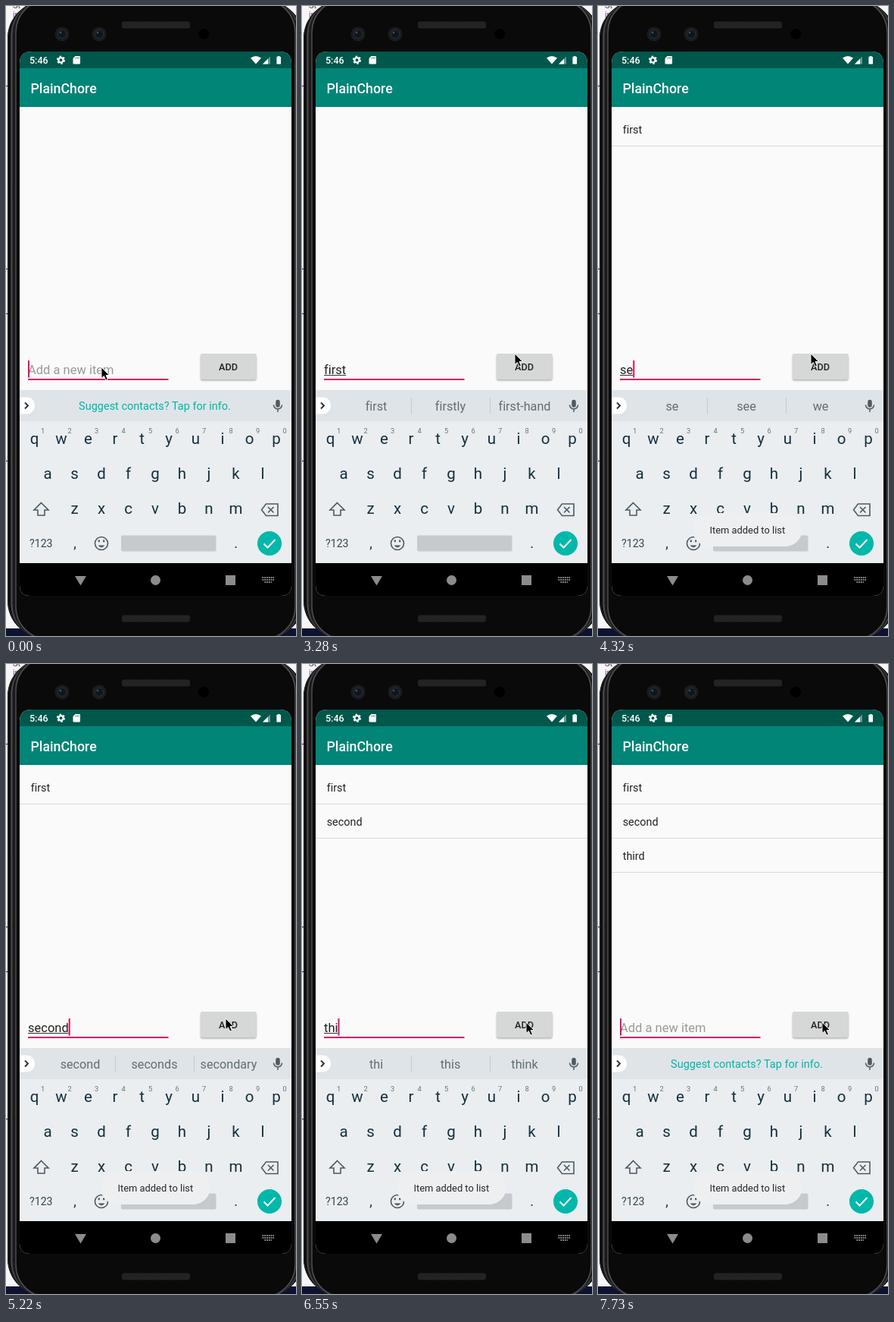
These frames come from a looping animation (383 by 830 pixels, 8000 ms). An HTML page:

```html
<!DOCTYPE html>
<html lang="en">
<head>
<meta charset="utf-8">
<title>Todo list demo</title>
<style>
  html, body { margin: 0; width: 100%; height: 100%; overflow: hidden; background: #f6f6f9; }
  svg { display: block; width: 100%; height: 100%; }
  text { font-family: Roboto, "Noto Sans", sans-serif; font-variant-ligatures: none; white-space: pre; }
  .mid { text-anchor: middle; }
  .medium { font-weight: 500; }
</style>
</head>
<body>
<svg viewBox="0 0 383 830" preserveAspectRatio="none">
  <defs>
    <clipPath id="screenClip"><path d="M18 76q0-16 16-16H361q16 0 16 16V763q0 14-14 14H32q-14 0-14-14Z"/></clipPath>
    <pattern id="mesh" width="3" height="3" patternUnits="userSpaceOnUse">
      <rect width="3" height="3" fill="#1d1d1d"/><path d="M0 3L3 0" stroke="#343434" stroke-width=".8"/>
    </pattern>
    <filter id="soft" x="-20%" y="-40%" width="140%" height="190%"><feGaussianBlur stdDeviation="1.2"/></filter>
  </defs>

  <!-- desktop behind the phone -->
  <text x="9" y="3" font-size="11" fill="#444">St</text>
  <text x="9" y="15" font-size="10" fill="#7a3a8c">in</text>
  <path d="M0 105.5h3M0 346.5h3M0 405.5h3M0 599.5h3" stroke="#1c1c86"/>
  <rect y="820" width="383" height="10" fill="#0d1230"/>

  <!-- phone body -->
  <rect x="2" y="-7" width="391" height="840" rx="50" fill="#0a0a0a"/>
  <g fill="none">
    <rect x="3" y="-6" width="389" height="838" rx="49" stroke="#1a1a1b" stroke-width="2"/>
    <rect x="7.5" y="-7.500" width="380" height="841" rx="47" stroke="#48494b" stroke-width="2.500"/>
    <rect x="10.500" y="-8" width="374" height="842" rx="45.500" stroke="#1b1b1c" stroke-width="3.500"/>
    <rect x="13" y="-9" width="369" height="844" rx="44" stroke="#4d4e50" stroke-width="1.500"/>
  </g>
  <rect x="153" y="20.500" width="90" height="9" rx="3" fill="url(#mesh)"/>
  <rect x="153" y="802.500" width="90" height="9" rx="3" fill="url(#mesh)"/>
  <g id="lenses"></g>
  <circle cx="261" cy="37" r="7" fill="#000"/>

  <g clip-path="url(#screenClip)">
    <rect x="18" y="60" width="359" height="717" fill="#fafafa"/>
    <rect x="18" y="82" width="359" height="51" fill="#008577"/>
    <rect x="18" y="133" width="359" height="1" fill="#f1f2f2"/>
    <rect x="18" y="60" width="359" height="22" fill="#00574b"/>

    <!-- status bar -->
    <g fill="#fff">
      <text class="medium" x="31" y="75.800" font-size="12.500">5:46</text>
      <g transform="translate(72.500 71.200)">
        <circle r="3.100" fill="none" stroke="#fff" stroke-width="2.300"/>
        <circle r="4.700" fill="none" stroke="#fff" stroke-width="1.800" stroke-dasharray="2.460 2.460"/>
      </g>
      <path d="M91.500 66H97q1 0 1 1v8.500q0 1-1 1H89.500q-1 0-1-1V69Z"/>
      <path d="M92.500 67.500v2M94.500 67.500v2M96.300 67.500v2" stroke="#00574b" stroke-width=".8"/>
      <path d="M323 68.500q7-5 14 0l-7 8Z"/>
      <path d="M339 76.500L349 66.500V76.500Z" opacity=".4"/>
      <path d="M339 76.500L346 69.500V76.500Z"/>
      <path d="M358.700 66h3v1h1.300v9.500h-5.600V67h1.300Z"/>
      <text class="medium" x="32.500" y="114.800" font-size="17.800">PlainChore</text>
    </g>

    <g id="rows" font-size="14.400" fill="#222"></g>

    <!-- input line -->
    <text id="hint" x="29" y="484.500" font-size="16.500" fill="#9a9a9a">Add a new item</text>
    <text id="typed" x="29" y="484.500" font-size="16.500" fill="#212121"></text>
    <rect id="compose" x="29" y="486" height="1" fill="#333"/>
    <rect x="29" y="491" width="185.500" height="2" fill="#dc1065"/>
    <rect id="caret" y="467" width="2" height="22.500" fill="#dc1065"/>
    <rect x="257" y="460" width="73.500" height="33.500" rx="2" opacity=".3" filter="url(#soft)"/>
    <rect id="button" x="257" y="458" width="73.500" height="34" rx="2"/>
    <text class="mid medium" x="293.500" y="480" font-size="12.700" fill="#222">ADD</text>

    <!-- keyboard -->
    <rect x="18" y="506" width="359" height="228" fill="#eaeef1"/>
    <rect x="18" y="506" width="359" height="41" fill="#dfe4e8"/>
    <path d="M18 515.500H27a11 11 0 0 1 0 22H18Z" fill="#fff"/>
    <path d="M25 522.500l4 4-4 4" fill="none" stroke="#263238" stroke-width="1.900"/>
    <text id="offer" class="mid" x="196.500" y="532" font-size="14.500" fill="#00b5a5">Suggest contacts? Tap for info.</text>
    <g id="words" class="mid" font-size="16.200" fill="#5f6d75">
      <path d="M144.500 516v21.500M248.500 516v21.500" stroke="#c3cacf"/>
      <text x="98" y="532.800"></text><text x="196" y="532.800"></text><text x="294" y="532.800"></text>
    </g>
    <g fill="none" stroke="#4c5a63" stroke-width="1.500">
      <rect x="357" y="519.500" width="4" height="8.500" rx="2" fill="#4c5a63"/>
      <path d="M353.500 525.500a5.500 5.500 0 0 0 11 0M359 531v4"/>
    </g>
    <g id="keys" class="mid" fill="#14303d"></g>
    <g fill="none" stroke="#4c5a63" stroke-width="1.600">
      <path d="M46.500 654.500L56 664H51V671H42V664H37Z"/>
      <path d="M343.500 656H359V671.500H343.500L337.500 663.800Z"/>
      <path d="M346 660l7.500 7.500M353.500 660l-7.500 7.500"/>
      <circle cx="126" cy="708" r="8.500"/>
      <path d="M121.500 710.500q4.500 5.500 9 0Z" fill="#4c5a63" stroke="none"/>
      <path d="M122.800 703.500v2.800M129.200 703.500v2.800" stroke-width="2.200"/>
    </g>
    <text class="mid" x="46.300" y="713" font-size="14.200" fill="#33464f">?123</text>
    <text class="mid" x="91" y="714" font-size="18" fill="#14303d">,</text>
    <text class="mid" x="303.500" y="714" font-size="18" fill="#14303d">.</text>
    <rect x="152" y="697.500" width="125.500" height="21" rx="2" fill="#c6cacf"/>
    <circle cx="348" cy="708" r="16" fill="#00b8a9"/>
    <path d="M340.500 708.500l5 5 10-10.500" fill="none" stroke="#fff" stroke-width="2"/>

    <!-- navigation -->
    <rect x="18" y="734" width="359" height="43" fill="#000"/>
    <g fill="#8c8c8c">
      <path d="M91 751H106L98.500 763.500Z"/>
      <circle cx="197.500" cy="756.500" r="6.500"/>
      <rect x="290" y="750" width="13" height="13"/>
      <path d="M338.500 753H354M338.500 756H354M341.500 759H351" stroke="#8c8c8c" stroke-width="1.800" stroke-dasharray="1.800 1"/>
    </g>

    <g id="toast">
      <rect x="125" y="668" width="144.500" height="44" rx="22" fill="#eeeff0"/>
      <text class="mid" x="197.300" y="695" font-size="12.900" fill="#262626">Item added to list</text>
    </g>
  </g>

  <path id="pointer" d="M0 0V14.500L3.400 11.400L5.800 17L8.400 15.900L6 10.500H10.500Z" fill="#000" stroke="#fff" stroke-width=".9"/>
</svg>
<script>
const NS = 'http://www.w3.org/2000/svg';
const LOOP = 8000;
const $ = id => document.getElementById(id);

function add(parent, tag, attrs, content = '') {
  const el = document.createElementNS(NS, tag);
  for (const name in attrs) el.setAttribute(name, attrs[name]);
  el.textContent = content;
  return parent.appendChild(el);
}

// Each track lists [start time, value]; a value holds until the next start.
const tracks = {
  text: [[0, ''], [1050, 'f'], [1500, 'fi'], [2390, 'fir'], [2690, 'firs'], [2840, 'first'], [3430, ''],
    [4170, 's'], [4320, 'se'], [4620, 'sec'], [4770, 'seco'], [4920, 'secon'], [5220, 'second'], [5510, ''],
    [6400, 'th'], [6550, 'thi'], [6700, 'thir'], [6840, 'third'], [7580, '']],
  caret: [[0, 1], [450, 0], [1050, 1], [1950, 0], [2390, 1], [3280, 0], [3430, 1], [3870, 0],
    [4170, 1], [5950, 0], [6400, 1], [7290, 0], [7580, 1]],
  pointer: [[0, [126, 476]], [150, [115, 477]], [300, [104, 477]], [450, [98, 476]],
    [2990, [205, 467]], [3130, [272, 459]], [3280, [281, 458]], [5220, [290, 467]], [5370, [296, 472]]],
  pressed: [[0, 0], [3430, 1], [3570, 0], [5510, 1], [5950, 0], [7430, 1], [7730, 0]],
  count: [[0, 0], [3430, 1], [5510, 2], [7580, 3]],
  toast: [[0, 0], [3570, .15], [3720, .6], [3870, 1], [5510, .5], [5660, .15], [5800, .55], [5950, 1]]
};

const suggestions = {
  fir: 'fir for fire', firs: 'firs first fires', first: 'first firstly first-hand',
  s: 's so is', se: 'se see we', sec: 'sec second secret', seco: 'seco second seconds',
  secon: 'second seconds secondary', second: 'second seconds secondary',
  th: 'th the that', thi: 'thi this think', thir: 'thir third thirty', third: 'third thirds third-party'
};

function at(track, t) {
  let value = track[0][1];
  for (const [start, next] of track) if (t >= start) value = next;
  return value;
}

const show = (el, on) => el.setAttribute('visibility', on ? 'visible' : 'hidden');

for (const x of [74, 123]) {
  add($('lenses'), 'circle', { cx: x, cy: 37, r: 9.5, fill: '#1a1c1f' });
  add($('lenses'), 'circle', { cx: x, cy: 37, r: 5.5, fill: '#10151d', stroke: '#29323d' });
  add($('lenses'), 'circle', { cx: x - 2, cy: 35, r: 1.5, fill: '#3c4a5c' });
}

[['qwertyuiop', 37.5, 576.7], ['asdfghjkl', 55, 622.5], ['zxcvbnm', 90.5, 669]].forEach(([letters, x0, y], row) => {
  [...letters].forEach((letter, i) => {
    const x = x0 + i * 35.5;
    add($('keys'), 'text', { x, y, 'font-size': 20.5 }, letter);
    if (!row) add($('keys'), 'text', { x: x + 11, y: 562.5, 'font-size': 9.3, fill: '#66747c' }, (i + 1) % 10);
  });
});

const rows = ['first', 'second', 'third'].map((label, i) => {
  const row = add($('rows'), 'g', { transform: `translate(0 ${i * 45})` });
  add(row, 'text', { x: 32.7, y: 168 }, label);
  add(row, 'rect', { x: 18, y: 184, width: 359, height: 1, fill: '#d9d9d9' });
  return row;
});

const wordSlots = [...$('words').querySelectorAll('text')];

function draw(t) {
  const text = at(tracks.text, t);
  const typed = $('typed');
  typed.textContent = text;
  const width = text ? typed.getComputedTextLength() : 0;
  $('compose').setAttribute('width', width);
  $('caret').setAttribute('x', 29 + width);
  show($('caret'), at(tracks.caret, t));
  show($('hint'), !text);

  const words = suggestions[text];
  show($('offer'), !words);
  show($('words'), words);
  if (words) words.split(' ').forEach((word, i) => wordSlots[i].textContent = word);

  const count = at(tracks.count, t);
  rows.forEach((row, i) => show(row, i < count));
  $('button').setAttribute('fill', at(tracks.pressed, t) ? '#cccdcd' : '#d6d7d7');
  $('toast').setAttribute('opacity', at(tracks.toast, t));
  $('pointer').setAttribute('transform', `translate(${at(tracks.pointer, t)})`);
}

const begin = performance.now();
function tick() {
  draw((performance.now() - begin) % LOOP);
  requestAnimationFrame(tick);
}
tick();
</script>
</body>
</html>
```
